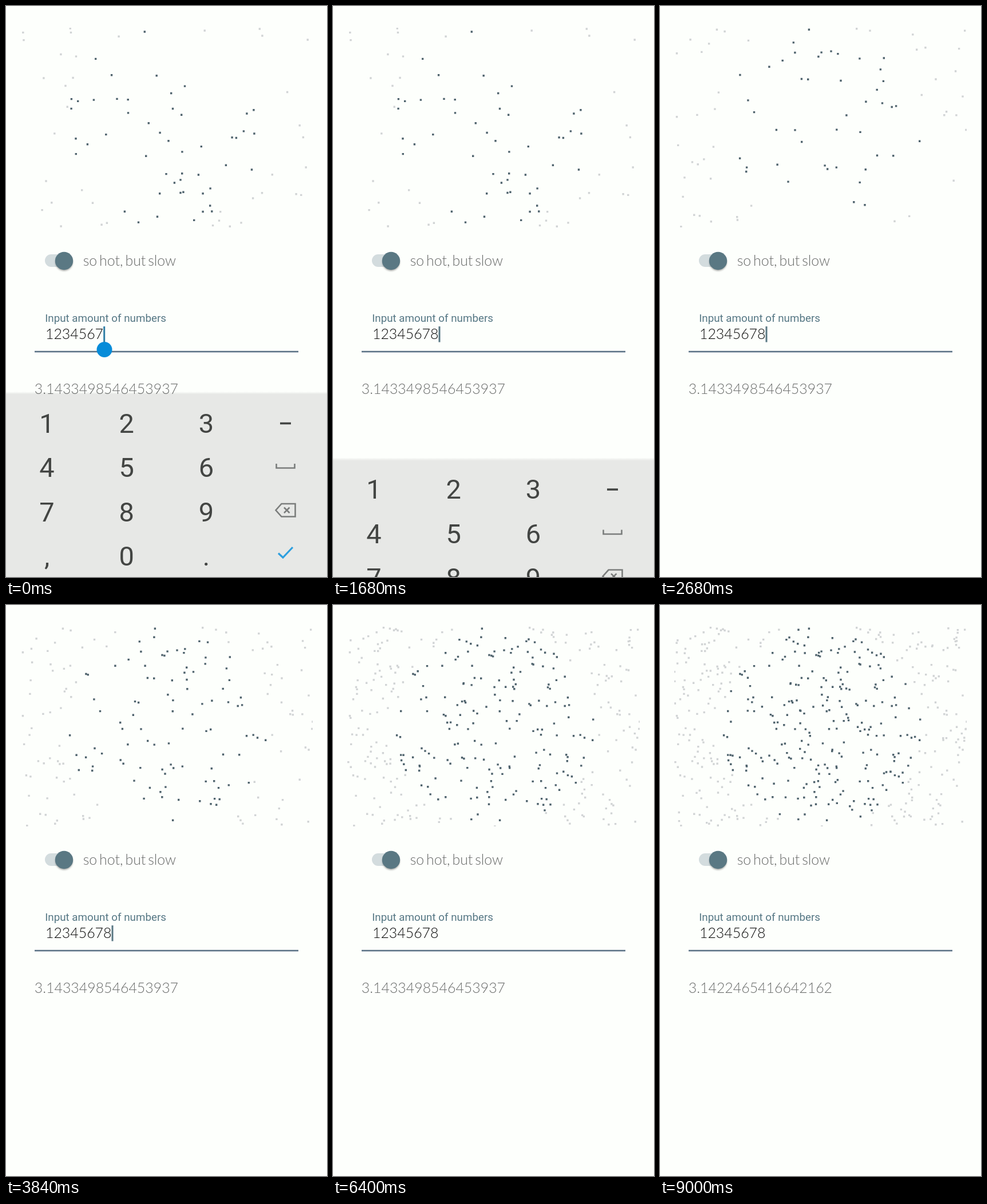
These frames come from a looping animation (561x998 px, 9120 ms). An HTML page:

```html
<!DOCTYPE html>
<html lang="en">
<head>
<meta charset="utf-8">
<title>Pi by random points</title>
<style>
html, body { margin: 0; width: 100%; height: 100%; overflow: hidden; background: #fdfffc; }
svg { display: block; width: 561px; height: 998px; }
.light { font: 300 24.9px Lato, sans-serif; word-spacing: -2.8px; }
.label { font: 400 18.8px Roboto, sans-serif; fill: #557784; }
.key { font: 400 47px Roboto, sans-serif; fill: #434543; text-anchor: middle; }
.icon { fill: none; stroke: #7b7d7c; stroke-width: 2.6; }
.icon.minus { stroke: #434543; stroke-width: 3.6; }
.icon.check { stroke: #2d9fdf; stroke-width: 3.2; }
</style>
</head>
<body>
<svg viewBox="0 0 561 998">
  <defs>
    <clipPath id="board"><rect x="25" y="38" width="511" height="349"/></clipPath>
    <filter id="soft" x="-30%" y="-30%" width="160%" height="160%"><feGaussianBlur stdDeviation="1.5"/></filter>
    <linearGradient id="edge" x2="0" y2="1">
      <stop stop-color="#000" stop-opacity="0"/><stop offset="1" stop-color="#000" stop-opacity=".08"/>
    </linearGradient>
  </defs>
  <rect width="561" height="998" fill="#fdfffc"/>
  <g clip-path="url(#board)">
    <path id="outer" fill="#d1d4d5"/>
    <path id="inner" fill="#4f636d"/>
  </g>
  <rect x="68" y="434" width="46" height="22" rx="11" fill="#d3dcde"/>
  <circle cx="101.5" cy="448" r="15" fill="#000" opacity=".35" filter="url(#soft)"/>
  <circle cx="101.5" cy="445.5" r="15.7" fill="#5a7883"/>
  <text class="light" x="134.7" y="454" fill="#666867">so hot, but slow</text>
  <text class="label" x="68.2" y="552">Input amount of numbers</text>
  <text class="light" id="amount" x="69" y="582" fill="#0c0c0c"></text>
  <rect x="50" y="602.8" width="461" height="2.6" fill="#5b7286"/>
  <rect id="caret" y="560" width="3" height="27.5"/>
  <circle id="handle" cx="172" cy="600.5" r="13.5" fill="#078cd9"/>
  <text class="light" id="result" x="49.8" y="678" fill="#6c6e6d"></text>
  <g id="keyboard">
    <rect y="674" width="561" height="4" fill="url(#edge)"/>
    <rect y="678" width="561" height="320" fill="#e7e8e6"/>
    <g id="keys"></g>
    <path class="icon minus" d="M479 729.5h19"/>
    <path class="icon" d="M472.5 800v7.5h32v-7.5"/>
    <path class="icon" d="M481.5 870h24v22.5h-24l-10-11.25zM486 876.5l9.5 9.5m0-9.5l-9.5 9.5"/>
    <path class="icon check" d="M476 956.5l8 7.5 17-18"/>
  </g>
</svg>
<script>
const LOOP = 9120, STEP = 40, TYPED = 400, CLEAR = 1960, DONE = 8080, END = 8120;
const BOARD = { x: 25, y: 38, w: 511, h: 349 };
const CIRCLE = { x: 281, y: 212, r: 174.5 };
const DOT = 3.4;
const $ = id => document.getElementById(id);

function generator(seed) {
  return () => {
    seed = (seed + 0x6D2B79F5) | 0;
    let t = Math.imul(seed ^ seed >>> 15, 1 | seed);
    t = t + Math.imul(t ^ t >>> 7, 61 | t) ^ t;
    return ((t ^ t >>> 14) >>> 0) / 4294967296;
  };
}

function scatter(seed, count) {
  const random = generator(seed);
  return Array.from({ length: count }, () => {
    const x = BOARD.x + random() * BOARD.w;
    const y = BOARD.y + random() * BOARD.h;
    return { x, y, inside: Math.hypot(x - CIRCLE.x, y - CIRCLE.y) <= CIRCLE.r };
  });
}

const before = scatter(7, 88);
const after = scatter(31415, 520);

// Points arrive quickly at first, then a little slower.
const countAt = t => Math.floor(86 * Math.pow((Math.min(t, END) - CLEAR + STEP) / 720, 0.827));

const squares = points => points
  .map(p => `M${(p.x - DOT / 2).toFixed(1)} ${(p.y - DOT / 2).toFixed(1)}h${DOT}v${DOT}h-${DOT}z`)
  .join("");

function drawPoints(points) {
  $("inner").setAttribute("d", squares(points.filter(p => p.inside)));
  $("outer").setAttribute("d", squares(points.filter(p => !p.inside)));
}

function keyboardShift(t) {
  const p = Math.min(1, Math.max(0, (t - 1600) / 120));
  return 325 * Math.pow(p, 2.55);
}

function caretOn(t) {
  if (t < 1520) return t < 920;
  return Math.floor(t / 500) % 2 === 1;
}

function draw(t) {
  const typed = t >= TYPED;
  drawPoints(t < CLEAR ? before : after.slice(0, countAt(t)));
  $("amount").textContent = typed ? "12345678" : "1234567";
  $("result").textContent = t < DONE ? "3.1433498546453937" : "3.1422465416642162";
  $("handle").style.display = typed ? "none" : "";
  $("caret").style.display = caretOn(t) ? "" : "none";
  $("caret").setAttribute("x", typed ? 184.5 : 170.2);
  $("caret").setAttribute("fill", typed ? "#5a7883" : "#2f7ea6");
  $("keyboard").setAttribute("transform", `translate(0 ${keyboardShift(t)})`);
}

["123", "456", "789", ",0."].forEach((row, r) => [...row].forEach((char, c) => {
  const key = document.createElementNS("http://www.w3.org/2000/svg", "text");
  key.setAttribute("class", "key");
  key.setAttribute("x", 71.5 + 139.2 * c);
  key.setAttribute("y", 745.5 + 77.5 * r);
  key.textContent = char;
  $("keys").append(key);
}));

const start = performance.now();
let last = -1;
function tick() {
  const t = Math.floor(((performance.now() - start) % LOOP) / STEP) * STEP;
  if (t !== last) draw(last = t);
  requestAnimationFrame(tick);
}
tick();
</script>
</body>
</html>
```
